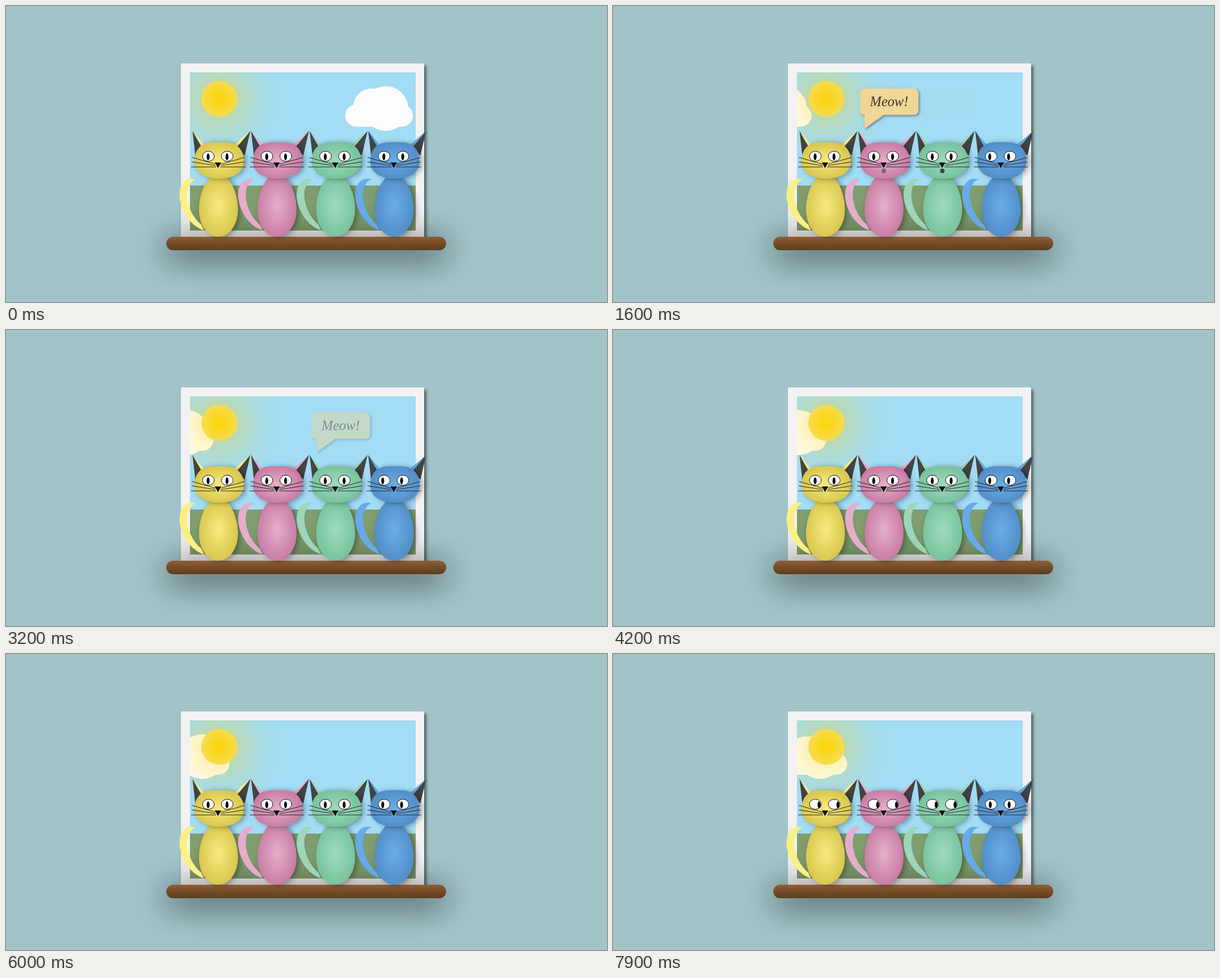
Write an HTML page that moves like this. It is 1065 by 526 pixels and loops after 8000 ms.

```html
<!DOCTYPE html>
<html lang="en">
<head>
<meta charset="utf-8">
<title>Cats on a shelf</title>
<style>
  html, body { margin: 0; width: 100%; height: 100%; overflow: hidden; background: #a2c4c9; }
  div, svg { position: absolute; }
  .frame { left: 310px; top: 102px; width: 431px; height: 311px; border-radius: 2px;
    background: #f2f2f2; box-shadow: 4px 4px 5px rgba(0, 0, 0, .5); }
  .view { left: 15.5px; top: 15.5px; width: 400px; height: 281px; overflow: hidden;
    background: linear-gradient(#a3dcf5 200.5px, #7f9d6e 0); }
  .cloud { left: 0; top: 24px; }
  .sun { left: 20px; top: 15px; width: 64px; height: 64px; border-radius: 50%;
    background: radial-gradient(#fcd60f 10%, #f7dc4f 70%); box-shadow: 0 0 80px 5px rgba(255, 215, 0, .95); }
  .shelf { left: 284px; top: 410px; width: 495.5px; height: 24px; border-radius: 12px;
    background: linear-gradient(#8f5d35, #5d3d1c); box-shadow: 0 10px 60px rgba(0, 0, 0, .88); }
  .shade { filter: drop-shadow(4px 1px 5px rgba(0, 0, 0, .35)); }
  .bubble { filter: drop-shadow(2px 2px 2px rgba(0, 0, 0, .4)); }
  text { font: italic 24.5px "Liberation Serif", serif; fill: #3d3329; }
</style>
</head>
<body>
<div class="frame">
  <div class="view">
    <svg class="cloud" id="cloud" width="120" height="81" fill="#fdfdfd">
      <rect y="33" width="120" height="39.5" rx="19.7"/>
      <circle cx="47" cy="37" r="32.5"/>
      <circle cx="72" cy="40.3" r="39.8"/>
    </svg>
    <div class="sun"></div>
  </div>
</div>
<div class="shelf"></div>
<svg id="stage" width="1065" height="526" style="left:0;top:0"></svg>

<script>
const stage = document.getElementById('stage');
const cloud = document.getElementById('cloud');
const LOOP = 8000, STEP = 100, SPACING = 103.8;

// light centre, dark rim, tail
const coats = [
  ['#f8eb7e', '#d9c74f', '#fbf083'],
  ['#e6afcb', '#c97da5', '#e6adca'],
  ['#9fdabe', '#78c49e', '#9dd6b9'],
  ['#68ade9', '#538fc8', '#66aae8']
];

const eye = (x, y = 267) => `
  <ellipse cx="${x}" cy="${y}" rx="10.4" ry="9" fill="#fff" stroke="#111"/>
  <ellipse class="pupil" cx="${x - .4}" cy="${y + 1}" rx="2.6" ry="6"/>`;

const cat = ([light, dark, tail], i) => `
  <radialGradient id="fur${i}"><stop stop-color="${light}"/><stop offset="1" stop-color="${dark}"/></radialGradient>
  <g class="cat" transform="translate(${i * SPACING})">
    <path fill="${tail}" d="M336 308C322 303 307 313 307.5 338C309 362 325 390 351 399L346 388
      C332 378 321 355 321 335C321 322 327 311 336 308Z"/>
    <path class="shade" fill="url(#fur${i})" d="M342 362C342 330 357 299 376.3 299S411 330 411 362
      C411 389 395.500 410 376.300 410S342 389 342 362Z"/>
    <path fill="${tail}" d="M330.500 222L352 248L336 264ZM433 222L403 248L422 264Z"/>
    <path fill="#444" d="M330.500 222L347 251L335.500 266ZM433 222L409 251L423 266Z"/>
    <path class="shade" fill="url(#fur${i})" d="M334 276C334 255 346 242 367 242H388C409 242 421.500 255 421.500 276
      C421.500 296 403 307 377.800 307S334 296 334 276Z"/>
    ${eye(358.6)}${eye(392)}
    <path stroke="#222" fill="none" d="M329.500 269L371 281M329.500 277L371 283.500M328 286H372
      M423 269L381 281M423 277L381 283.500M424 286H380"/>
    <path d="M370 278H381.500L375.700 288Z" fill="#111"/>
    <circle class="mouth" cx="376" cy="293" r="4" fill="#444"/>
  </g>`;

const bubble = (_, i) => `
  <g class="bubble" transform="translate(${i * SPACING})" opacity="0">
    <path fill="#efd796" d="M342 146.500H429.500a8 8 0 0 1 8 8V185.500a8 8 0 0 1-8 8H376L342 218V193.500
      a8 8 0 0 1-8-8V154.500a8 8 0 0 1 8-8Z"/>
    <text x="385.500" y="178" text-anchor="middle">Meow!</text>
  </g>`;

stage.innerHTML = coats.map(cat).join('') + coats.slice(0, 3).map(bubble).join('');

const cats = [...stage.querySelectorAll('.cat')].map(el => ({
  pupils: el.querySelectorAll('.pupil'),
  mouth: el.querySelector('.mouth')
}));
const bubbles = stage.querySelectorAll('.bubble');

const ease = (t, from, to) => {
  const x = Math.min(1, Math.max(0, (t - from) / (to - from)));
  return x * x * (3 - 2 * x);
};
const pulse = (t, inStart, inEnd, outStart, outEnd) =>
  ease(t, inStart, inEnd) * (1 - ease(t, outStart, outEnd));

function draw(t) {
  const started = t >= 600;
  // the cloud crosses 400px in 40s, then starts over
  const x = (started ? -110 : 275) + t / 100;
  cloud.style.transform = `translateX(${x}px)`;

  const turn = ease(t, 6000, 6300);
  cats.forEach(({ pupils, mouth }, i) => {
    const look = i < 3 ? 7 * turn : started ? turn - 2 : 0;
    pupils.forEach(p => p.setAttribute('transform', `translate(${look})`));

    const local = t - (i - 1) * 1000;
    const meows = started && i < 3;
    mouth.setAttribute('opacity', meows ? pulse(local, 400, 580, 1490, 1750) : 0);
    if (i < 3) bubbles[i].setAttribute('opacity', meows ? pulse(local, 540, 1540, 1670, 2670) : 0);
  });
}

function tick(now) {
  draw(Math.floor(now % LOOP / STEP) * STEP);
  requestAnimationFrame(tick);
}
draw(0);
requestAnimationFrame(tick);
</script>
</body>
</html>
```
